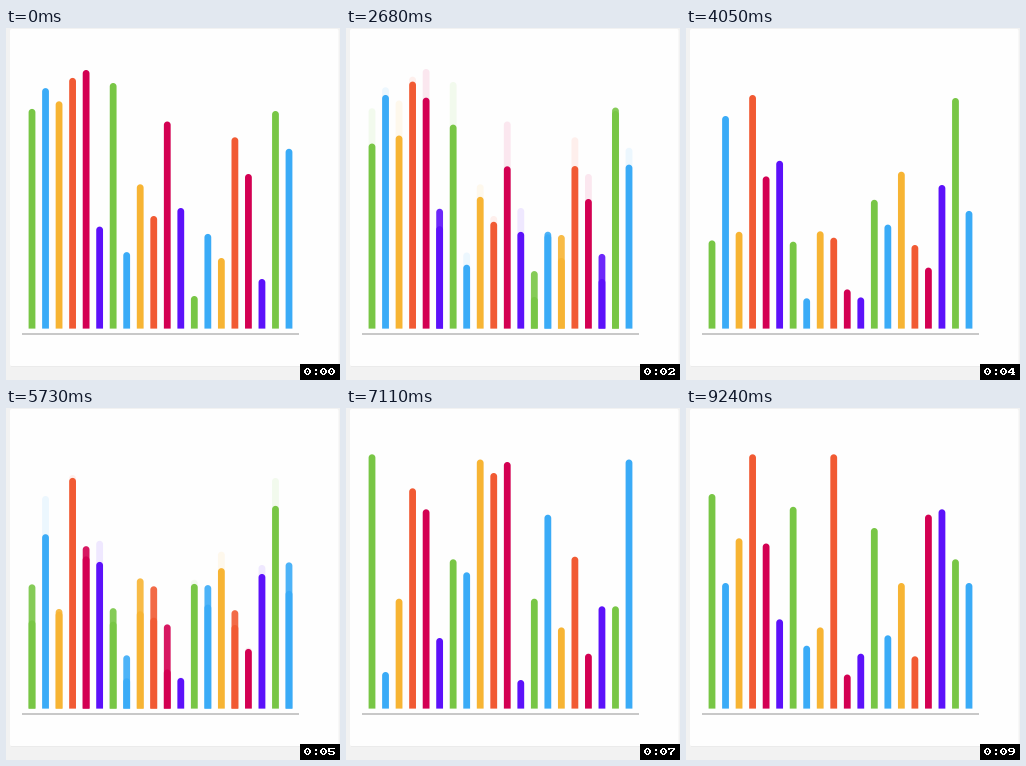
A matplotlib script that plays this animation: 334x352 px, repeating every 9.47 s.

```python
import numpy as np
import matplotlib.pyplot as plt
from matplotlib.animation import FuncAnimation
from matplotlib.collections import PolyCollection
from matplotlib.colors import to_rgb
from matplotlib.patches import FancyBboxPatch, Rectangle

W, H, DPI = 334, 352, 64
STEP, FRAMES = 21, 451
LEAD = 18  # each frame shows the chart near the end of its interval

COLORS = ["#78c645", "#3aabf7", "#f7b433", "#f15a33", "#d30052", "#5c11fa"]
N = 20
BAR_X = np.linspace(26, 283, N)
BAR_R = 3.4
FLOOR = 300.6
RGB = np.array([to_rgb(COLORS[i % 6]) for i in range(N)])

# Bar tops of each chart state, in pixels from the top
STATES = np.array([
    [80.3, 59.3, 72.5, 48.7, 41, 198.2, 54, 224.5, 156.3, 188,
     93.5, 180, 269, 206.3, 230, 109.3, 146, 251, 83, 119.8],
    [212.4, 88, 203.8, 67, 148.4, 132.8, 213.7, 270.3, 203.3, 209.7,
     261.4, 269.4, 171.8, 196.6, 143.7, 217, 239.6, 157, 70, 182.9],
    [46.3, 264, 190.7, 80.3, 101.3, 230, 151.3, 164.3, 51.5, 65,
     54, 272, 190.7, 106.7, 219.4, 148.7, 245.7, 198.3, 198.3, 51.5],
    [86, 175, 130.3, 46.3, 135.5, 211.3, 98.8, 237.7, 219.4, 46.3,
     266.5, 245.7, 120, 227.3, 175, 248.3, 106.6, 101.3, 151.3, 175],
])
# What is left of the move into the first state when the loop begins
SETTLE = np.zeros(N)
SETTLE[[0, 1, 2, 3, 4, 5, 6, 7, 12, 13, 19]] = [
    .6, .8, .8, 1.2, 1, .4, 1, -.4, -1, -.4, 1]

# start, end, number of steps, lag in steps
MOVES = [(2570, 3090, 16, 0), (5620, 6150, 16, -.36), (8680, 9240, 17, -.3)]
TICKS = [990, 1980, 3000, 4050, 5030, 6020, 7110, 8100, 9010]

# Pen strokes of each glyph as "xy" points on a 7 x 7 grid
GLYPHS = {
    "0": ["30 20 02 04 26 36 54 52 30", "33"],
    "1": ["12 30 36", "16 56"],
    "2": ["01 10 40 51 52 43 33 06 56 55"],
    "3": ["01 10 40 51 52 43 23", "43 54 55 46 16 05"],
    "4": ["40 30 03 04 54", "40 46", "36 56"],
    "5": ["50 00 03 43 54 55 46 16 05"],
    "6": ["30 20 02 05 16 46 55 54 43 03"],
    "7": ["01 00 50 51 24 26"],
    "8": ["10 40 51 52 43 13 02 01 10", "13 04 05 16 46 55 54 43"],
    "9": ["10 40 51 54 45 36 16", "10 01 02 13 53"],
    ":": ["31 32", "35 36"],
}


def ease(u):
    """CSS 'ease' curve, cubic-bezier(.25, .1, .25, 1)."""
    u = min(max(u, 0), 1)
    lo, hi = 0.0, 1.0
    for _ in range(24):
        s = (lo + hi) / 2
        x = .75 * s * (1 - s) ** 2 + .75 * s * s * (1 - s) + s ** 3
        lo, hi = (s, hi) if x < u else (lo, s)
    return .3 * s * (1 - s) ** 2 + 3 * s * s * (1 - s) + s ** 3


def chart_at(t):
    """Old tops, current tops and the weight of the fading old image."""
    if t < 60:
        tops = STATES[0] + SETTLE
        return tops, tops, 0
    old = STATES[0]
    for (start, end, steps, lag), new in zip(MOVES, STATES[1:]):
        if t < start:
            break
        if t < end:
            k = int((t - start) * steps / (end - start))
            ghost = min(1, .28 * .34 ** (k - 2))
            return old, old + (new - old) * ease((k + lag) / steps), ghost
        old = new
    return old, old, 0


ARC = np.linspace(np.pi, 0, 13)
CAP_X, CAP_Y = BAR_R * np.cos(ARC), BAR_R * (1 - np.sin(ARC))


def bar(x, top):
    xs = np.r_[x - BAR_R, x + CAP_X, x + BAR_R]
    ys = np.r_[FLOOR, top + CAP_Y, FLOOR]
    return np.column_stack([xs, ys])


def bars(tops):
    return [bar(x, y) for x, y in zip(BAR_X, tops)]


def stamp(grid, char, left, top):
    for stroke in GLYPHS[char]:
        pts = [(int(p[0]), int(p[1])) for p in stroke.split()]
        if len(pts) == 1:
            grid[top + pts[0][1], left + pts[0][0]] = 1
        for (x0, y0), (x1, y1) in zip(pts, pts[1:]):
            n = max(abs(x1 - x0), abs(y1 - y0))
            for i in range(n + 1):
                x = left + x0 + (x1 - x0) * i // n
                y = top + y0 + (y1 - y0) * i // n
                grid[y, x:x + 2] = 1


def clock(second):
    grid = np.zeros((16, 40))
    for i, char in enumerate(f"0:{second:02d}"):
        stamp(grid, char, 4 + 8 * i, 4)
    return grid


CLOCKS = [clock(s) for s in range(10)]

fig = plt.figure(figsize=(W / DPI, H / DPI), dpi=DPI, facecolor="#f2f2f2")
ax = fig.add_axes([0, 0, 1, 1])
ax.axis("off")

ax.add_patch(FancyBboxPatch((5.5, 2.5), 325.5, 334, boxstyle="round,pad=1.5",
                            fc="#fefefe", ec="none"))
ax.add_patch(Rectangle((5, 338), 327, 1, fc="#ebebeb", ec="none"))
ax.add_patch(Rectangle((16, 305), 277, 1.5, fc="#c8c8c8", ec="none"))

back = PolyCollection(bars(STATES[0]), facecolors=RGB, edgecolors="none", zorder=3)
front = PolyCollection(bars(STATES[0]), facecolors=RGB, edgecolors="none", zorder=4)
ax.add_collection(back)
ax.add_collection(front)
timer = ax.imshow(CLOCKS[0], cmap="gray", vmin=0, vmax=1, zorder=5,
                  interpolation="nearest", extent=(294, 334, 352, 336))
ax.set_aspect("auto")
ax.set_xlim(0, W)
ax.set_ylim(H, 0)


def draw(i):
    t = i * STEP + LEAD
    old, now, ghost = chart_at(t)
    # The taller of the two images shows pale above the shorter one
    weight = np.where(old < now, ghost, 1 - ghost)[:, None]
    back.set_visible(ghost > .004)
    back.set_verts(bars(np.minimum(old, now)))
    back.set_facecolor(1 + (RGB - 1) * weight)
    front.set_verts(bars(np.maximum(old, now) if ghost > .004 else now))
    timer.set_data(CLOCKS[sum(t >= tick for tick in TICKS)])
    return back, front, timer


anim = FuncAnimation(fig, draw, frames=FRAMES, interval=STEP,
                     repeat=True, repeat_delay=0, blit=False)
plt.show()
```
